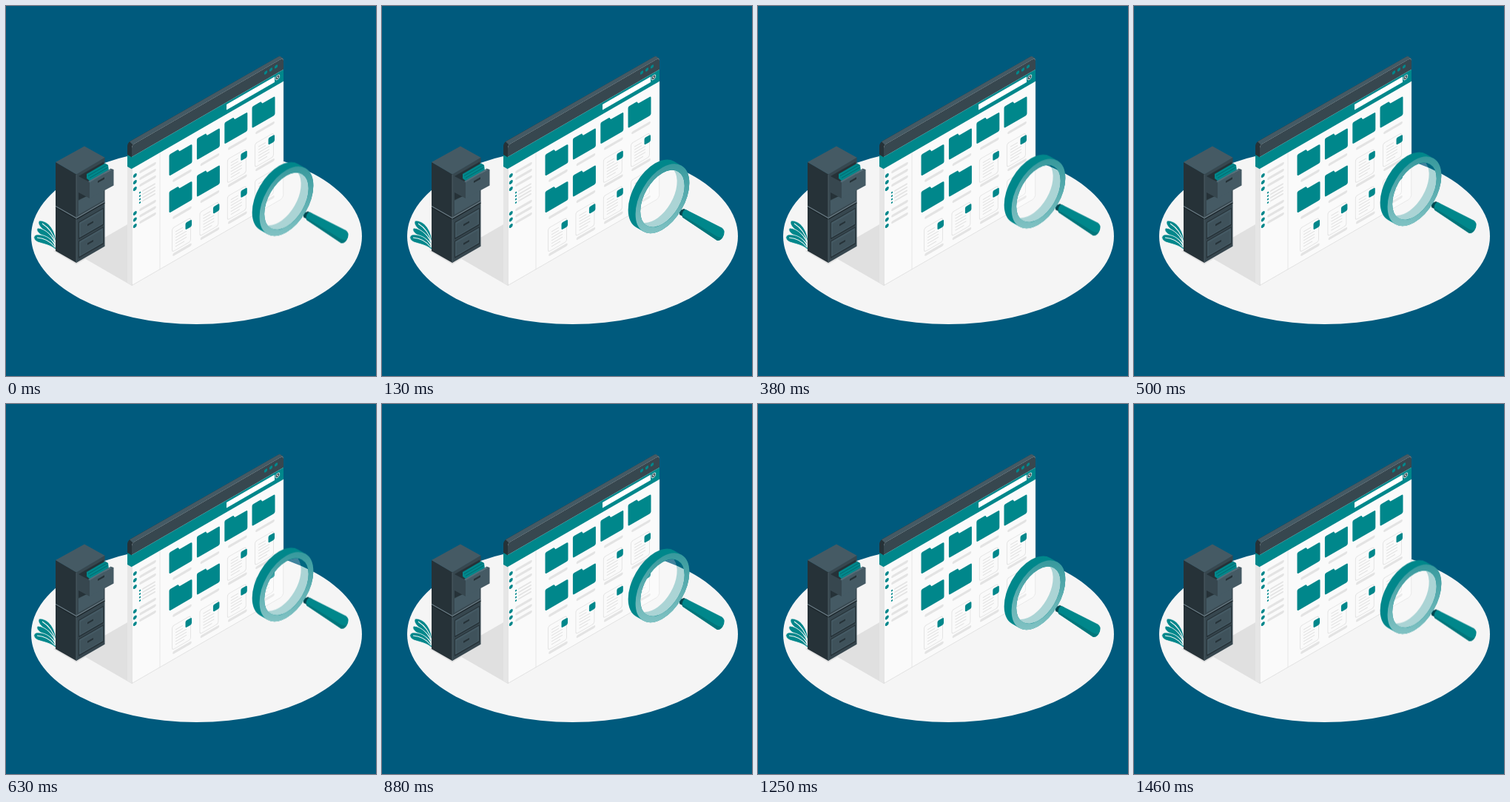
An HTML page that plays this animation: 500 by 500 pixels, repeating every 1500 ms.

```html
<!DOCTYPE html>
<html lang="en">
<head>
<meta charset="utf-8">
<title>File search</title>
<style>
  html, body { margin: 0; width: 100%; height: 100%; overflow: hidden; background: #005a7d; }
  svg { display: block; width: 100%; height: 100%; }
  .teal { fill: #00878b; }
  .dark { fill: #263238; }
  .mid { fill: #37474f; }
  .soft { fill: #455a64; }
  .bar { stroke: #e3e3e3; stroke-width: 3.6; stroke-linecap: round; fill: none; }
  .text { stroke: #dedede; stroke-width: 1; fill: none; }
  .glass { animation: float 1.5s linear -20ms infinite; }
  @keyframes float { 50% { transform: translateY(-20px); } }
</style>
</head>
<body>
<svg viewBox="0 0 500 500">
  <defs>
    <linearGradient id="rim" x1=".8" y1="0" x2=".3" y2="1">
      <stop offset="0" stop-color="#35989c"/>
      <stop offset="1" stop-color="#80c2c3"/>
    </linearGradient>
    <clipPath id="panel"><rect y="-16" width="205" height="190" rx="4"/></clipPath>
    <g id="folder">
      <path class="teal" d="M-.5 4q0-2 2-2h9q1.500 0 2 2l1 1.500h15q2 0 2 2v21.500q0 2-2 2h-27q-2 0-2-2z"/>
      <path class="bar" d="M6 40.500h22"/>
    </g>
    <g id="doc">
      <rect x="3.500" y="4" width="25" height="32" rx="3" fill="#fafafa" stroke="#e4e4e4"/>
      <path class="text" d="M8 11h10M8 15h10M8 19h15M8 23h15M8 27h15M8 31h12"/>
      <rect class="teal" x="21.500" y="7" width="8.500" height="9.500" rx="2"/>
      <path class="bar" d="M6 40.500h22"/>
    </g>
    <g id="item">
      <circle class="teal" cx="4.300" cy=".5" r="2.500"/>
      <path class="bar" d="M12 0h19"/>
    </g>
    <g id="sub">
      <circle class="teal" cx="11" r="1.200"/>
      <path class="bar" style="stroke-width:2" d="M15 0h16"/>
    </g>
    <g id="drawer">
      <path class="dark" d="M0 0l34-19.600v23.500l-34 19.600z"/>
      <path class="soft" d="M1 .8l32-18.500v20.500l-32 18.500z"/>
      <path d="M2.500 2.500l29-16.700v16.500l-29 16.700z" fill="#3f525b"/>
      <path class="dark" d="M12 3l8-4.600v2.400l-8 4.600z"/>
    </g>
  </defs>

  <ellipse cx="257.500" cy="311" rx="223.500" ry="119" fill="#f5f5f5"/>
  <path d="M170 378L106 341 133 313 166 294z" fill="#e0e0e0"/>
  <path d="M64 331L95 349 137 325 95 320z" fill="#e0e0e0"/>

  <!-- plant -->
  <g class="teal" stroke="#f5f5f5" stroke-width=".8" stroke-linejoin="round">
    <path d="M68 323C68 307 60 291 46 290 42 291 44 297 50 302 58 307 65 312 68 323z"/>
    <path d="M68 325C64 311 54 301 43 300 40 302 43 307 49 310 57 313 64 316 68 325z"/>
    <path d="M68 330C65 316 54 308 41 309 36 311 37 316 43 319 52 322 61 323 68 330z"/>
    <path d="M49 294Q63 303 67 319M42 313Q57 314 66 326" fill="none" stroke-width="1.100"/>
  </g>

  <!-- cabinet -->
  <g>
    <path class="dark" d="M67 211L95 227V347L67 331z"/>
    <path class="mid" d="M95 227L133.500 204.500V324.800L95 347z"/>
    <path class="soft" d="M67 211L106 189.500 133.500 204.800 95 227.500z"/>
    <path d="M67 270.500L95 286.500 133.500 264.300" fill="none" stroke="#6b7c85" stroke-width="1.200"/>
    <path d="M67 272.200L95 288.200 133.500 266" fill="none" stroke="#1d272c" stroke-width="1.300"/>
    <path d="M95 228V347" stroke="#53656e" stroke-width=".8"/>
    <path class="soft" d="M98 263L132 243.400V262.500L98 282z"/>
    <use href="#drawer" x="98" y="292"/>
    <use href="#drawer" x="98" y="317.500"/>
    <path class="dark" d="M98 230L132 210.500V247L98 262z"/>
    <path class="mid" d="M98 230L113 238V260L98 252z"/>
    <path class="teal" d="M109 227L134 212.500 138 215 139 223 114 237 109 233z"/>
    <path d="M111 229.500L137 214.500M113 232.500L138 218" stroke="#006a70" stroke-width="1"/>
    <path class="soft" d="M113 238L141 222V219.500L145.500 221V242.500L113 260z"/>
    <path d="M111 237L141 220 143 221 113 238.500z" fill="#546e7a"/>
    <path class="dark" d="M124 236.500l9-5.200v2.600l-9 5.200z"/>
  </g>

  <!-- browser window -->
  <path d="M164 215L171 219V378L164 374.500z" fill="#e6e6e6"/>
  <path class="teal" d="M164 200L171 204V221L164 217z"/>
  <path class="dark" d="M164 201V190Q164 185 168 182.500L369 68 374 71 173 188 171 205z"/>
  <path class="soft" d="M167 183.200L368 68.500Q370 67.500 372 69L375 71 172 188z"/>
  <g transform="translate(170 204) skewY(-30)">
    <g clip-path="url(#panel)">
      <rect y="-16" width="205" height="190" fill="#fafafa"/>
      <path d="M38 16V175" stroke="#e6e6e6"/>
      <rect class="mid" y="-16" width="205" height="16"/>
      <rect class="teal" width="205" height="16"/>
    </g>
    <path d="M.3 16V173.700H200.700Q204.700 173.700 204.700 169.700V16" fill="none" stroke="#dcdcdc" stroke-width=".7"/>
    <g class="teal">
      <circle cx="181" cy="-9.500" r="2.200"/>
      <circle cx="188" cy="-9.500" r="2.200"/>
      <circle cx="195" cy="-9.500" r="2.200"/>
    </g>
    <rect x="128" y="3" width="65" height="7.500" fill="#fff"/>
    <circle cx="197" cy="6.200" r="2.800" fill="#37474f" stroke="#d5e5e6" stroke-width=".8"/>
    <circle cx="197" cy="6.200" r=".9" fill="#fff"/>

    <use href="#item" y="27"/><use href="#item" y="36"/><use href="#item" y="45"/>
    <use href="#sub" y="54.500"/><use href="#sub" y="59"/><use href="#sub" y="63.500"/><use href="#sub" y="68"/>
    <use href="#item" y="78"/><use href="#item" y="86.500"/><use href="#item" y="95"/>

    <use href="#folder" x="51" y="24"/><use href="#folder" x="88.400" y="24"/>
    <use href="#folder" x="125.800" y="24"/><use href="#folder" x="163" y="24"/>
    <use href="#folder" x="51" y="74"/><use href="#folder" x="88.400" y="74"/>
    <use href="#doc" x="125.800" y="74"/><use href="#doc" x="163" y="74"/>
    <use href="#doc" x="51" y="124"/><use href="#doc" x="88.400" y="124"/>
    <use href="#doc" x="125.800" y="124"/><use href="#doc" x="163" y="124"/>
  </g>

  <!-- magnifier -->
  <g class="glass">
    <path d="M402 280.500L408 278 414 281 409 289.500 402 286z" fill="#00474f"/>
    <path class="teal" d="M410 278.800L459 303.500Q464 306.500 462 313.500 459 321.500 453 321L406 289.500Q404.500 282 410 278.800z"/>
    <path d="M405.500 286.500L451 314.500Q456 317.500 460 316.500 457 321.500 453 321L406 289.500z" fill="#00757a"/>
    <g transform="matrix(.866 -.5 0 1 369 258.500)">
      <path d="M29.400-17.900A34.500 34.500 0 0 1-17.900 29.400A34.500 34.500 0 0 1 29.400-17.900z" fill="#fff" opacity=".25"/>
      <path class="teal" opacity=".3" d="M29.400-17.900A34.500 34.500 0 1 1-17.900 29.400A34.500 34.500 0 0 0 29.400-17.900z"/>
      <path class="teal" fill-rule="evenodd" d="M-29.700 29.700A42 42 0 0 1 29.700-29.700l11.500 11.500A42 42 0 0 1-18.200 41.200zM-23 11.500a34.500 34.500 0 1 0 69 0a34.500 34.500 0 1 0-69 0z"/>
      <circle cx="11.500" cy="11.500" r="38.250" fill="none" stroke="url(#rim)" stroke-width="7.500"/>
    </g>
  </g>
</svg>
</body>
</html>
```
